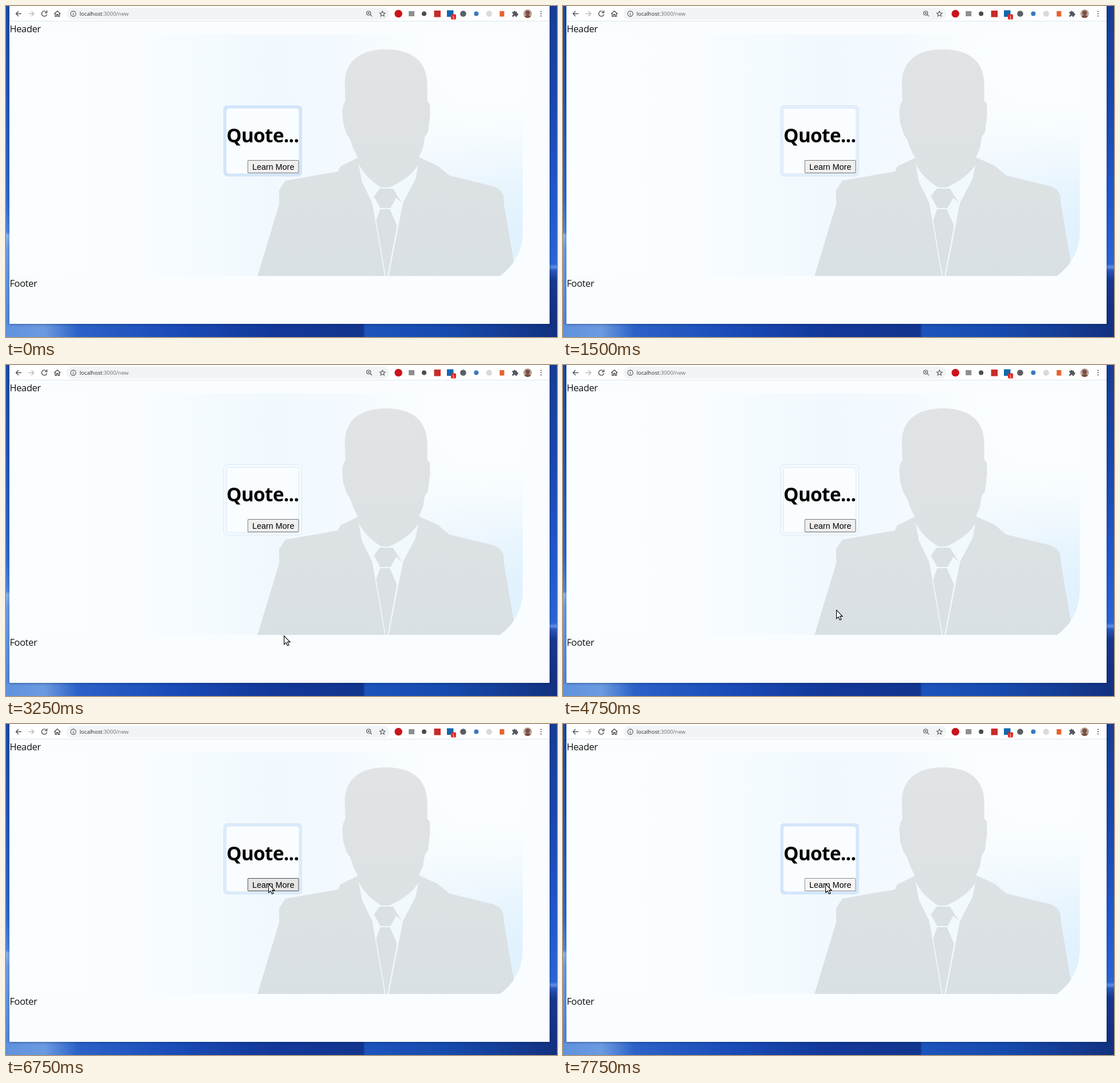
An HTML page that plays this animation: 966x580 px, repeating every 8000 ms.

```html
<!DOCTYPE html>
<html lang="en">
<head>
<meta charset="utf-8">
<title>Quote card</title>
<style>
html, body { margin: 0; width: 100%; height: 100%; overflow: hidden; background: #1c4fb8; }
svg { display: block; width: 966px; height: 580px; }
.ui { font-family: "Open Sans", "Noto Sans", sans-serif; }
.page { font-size: 16.5px; letter-spacing: -.35px; fill: #111; }
.icon { fill: none; stroke: #50545a; stroke-width: 1.4; }
</style>
</head>
<body>
<svg viewBox="0 0 966 580" xmlns="http://www.w3.org/2000/svg">
  <defs>
    <linearGradient id="side" x2="0" y2="1">
      <stop offset="0" stop-color="#1d4ba6"/><stop offset=".25" stop-color="#2053b4"/>
      <stop offset=".6" stop-color="#2e68d0"/><stop offset=".71" stop-color="#4f88de"/>
      <stop offset=".72" stop-color="#8fb4ec"/><stop offset=".76" stop-color="#6f9ee4"/>
      <stop offset="1" stop-color="#5488da"/>
    </linearGradient>
    <linearGradient id="right" x2="0" y2="1">
      <stop offset="0" stop-color="#173d94"/><stop offset=".3" stop-color="#1a48ae"/>
      <stop offset=".6" stop-color="#2058cc"/><stop offset=".81" stop-color="#2b64d4"/>
      <stop offset=".82" stop-color="#5f8fe4"/><stop offset=".83" stop-color="#2a55bc"/>
      <stop offset=".86" stop-color="#17388f"/><stop offset="1" stop-color="#142f80"/>
    </linearGradient>
    <linearGradient id="base">
      <stop offset="0" stop-color="#5f92de"/><stop offset=".07" stop-color="#6c9ae0"/>
      <stop offset=".13" stop-color="#2c62c8"/><stop offset=".3" stop-color="#1b4cb8"/>
      <stop offset=".48" stop-color="#12389a"/><stop offset=".648" stop-color="#12358e"/>
      <stop offset=".652" stop-color="#1c54bc"/><stop offset=".8" stop-color="#174aae"/>
      <stop offset="1" stop-color="#12317f"/>
    </linearGradient>
    <linearGradient id="sky">
      <stop offset="0" stop-color="#fbfeff"/><stop offset=".208" stop-color="#fafdff"/>
      <stop offset=".283" stop-color="#f8fcff"/><stop offset=".284" stop-color="#f6fcff"/>
      <stop offset=".5" stop-color="#f2f9fe"/><stop offset="1" stop-color="#f5fafe"/>
    </linearGradient>
    <radialGradient id="blue" gradientUnits="userSpaceOnUse" cx="915" cy="410" r="265">
      <stop offset="0" stop-color="#dff1fd"/><stop offset="1" stop-color="#dff1fd" stop-opacity="0"/>
    </radialGradient>
    <radialGradient id="white" gradientUnits="userSpaceOnUse" cx="850" cy="60" r="260">
      <stop offset="0" stop-color="#fbfeff"/><stop offset=".35" stop-color="#fbfeff"/>
      <stop offset="1" stop-color="#fbfeff" stop-opacity="0"/>
    </radialGradient>
    <linearGradient id="suit" x2="0" y2="1">
      <stop offset="0" stop-color="#e1e3e5"/><stop offset="1" stop-color="#d9e0e3"/>
    </linearGradient>
    <clipPath id="photo"><path d="M6 50H906V395C906 430 890 455 866 473H6Z"/></clipPath>
    <clipPath id="face"><circle cx="914.5" cy="13.5" r="7.5"/></clipPath>
    <filter id="soft" x="-5%" y="-5%" width="110%" height="110%"><feGaussianBlur stdDeviation="2"/></filter>
  </defs>

  <rect width="966" height="580" fill="url(#base)"/>
  <rect width="7" height="558" fill="url(#side)"/>
  <rect x="953" width="13" height="558" fill="url(#right)"/>
  <rect x="6" y="-5" width="947" height="563" fill="#061a4a" opacity=".45" filter="url(#soft)"/>
  <rect x="6" width="947" height="557" fill="#fafdff"/>
  <rect x="6" width="947" height="26" fill="#fff"/>
  <rect x="6" y="26" width="947" height="1" fill="#dfe3e6"/>

  <!-- toolbar -->
  <rect x="106" y="3" width="566" height="21" rx="10.5" fill="#f1f3f4"/>
  <g class="icon">
    <path d="M27 13.5H17.5M22 9L17.5 13.5L22 18"/>
    <path d="M39.5 13.5H49M44.5 9L49 13.5L44.5 18" stroke="#babcbe"/>
    <path d="M70.6 10.4A4.6 4.6 0 1 0 71.7 14.5M71.8 8V11.8H68"/>
    <path d="M84.5 13.8L90 8.8L95.5 13.8M86.3 12.5V18.3H88.7V14.8H91.3V18.3H93.7V12.5"/>
    <circle cx="118" cy="13.5" r="4.6" stroke-width="1.1"/>
    <path d="M118 12.8V16M118 10.8V11.8" stroke-width="1.2"/>
    <circle cx="635.8" cy="12.5" r="3.5" stroke-width="1.2"/>
    <path d="M638.5 15.2L641.5 18.2M634.2 12.5H637.4M635.8 10.9V14.1" stroke-width="1.2"/>
    <path d="M660 9L661.4 12.1 664.7 12.4 662.2 14.6 663 17.9 660 16.1 657 17.9 657.8 14.6 655.3 12.4 658.6 12.1Z" stroke-width="1.1"/>
  </g>
  <text class="ui" x="129" y="17" font-size="9.5" fill="#26282b">localhost<tspan fill="#6b7075">:3000/new</tspan></text>
  <circle cx="688" cy="13.5" r="6.8" fill="#c9141d"/>
  <rect x="706" y="9" width="10" height="9" fill="#8c9092"/>
  <circle cx="733" cy="13.5" r="4" fill="#484b50"/>
  <rect x="750.5" y="8" width="11.5" height="11.5" fill="#c62c28"/>
  <rect x="773" y="7.5" width="11.5" height="11.5" fill="#1268ad"/>
  <rect x="780" y="14.5" width="9" height="9" rx="1.5" fill="#df2a27"/>
  <text x="784.5" y="21.7" font-family="Liberation Sans, sans-serif" font-size="7" fill="#fff" text-anchor="middle">1</text>
  <circle cx="801.5" cy="13.5" r="5.3" fill="#5b5f64"/>
  <circle cx="824.5" cy="13.5" r="4" fill="#3b78bd"/>
  <circle cx="847" cy="13.5" r="5.2" fill="#d9dbdc"/>
  <rect x="865.5" y="9" width="8" height="9.5" fill="#e8622c"/>
  <path d="M887.5 10.3H890A1.7 1.7 0 1 1 893.4 10.3H896V13A1.7 1.7 0 1 1 896 16.3V18.7H893.2A1.6 1.6 0 0 0 890 18.7H887.5V16A1.6 1.6 0 0 0 887.5 12.8Z" fill="#55595e"/>
  <g clip-path="url(#face)">
    <rect x="907" y="6" width="15" height="15" fill="#b9a79c"/>
    <circle cx="914.5" cy="12" r="4" fill="#7b4e40"/>
    <ellipse cx="914.5" cy="21" rx="6.5" ry="5" fill="#7b4e40"/>
  </g>
  <g fill="#50545a"><circle cx="938" cy="9.5" r="1.1"/><circle cx="938" cy="13.5" r="1.1"/><circle cx="938" cy="17.5" r="1.1"/></g>

  <!-- hero -->
  <g clip-path="url(#photo)">
    <rect x="6" y="50" width="900" height="423" fill="url(#sky)"/>
    <rect x="6" y="50" width="900" height="423" fill="url(#blue)"/>
    <rect x="6" y="50" width="900" height="423" fill="url(#white)"/>
    <path fill="url(#suit)" d="M441 473L479 347 478.5 323 490 306 582 290 586 281 617 266 609 250 603 233 597 224 591 205 589.5 182 592 171 595 167 594 137C594 97 620 76 666 76C712 76 738 97 738.5 137L738.5 166 743 171 743.5 190 740 221 734 230 731 249 724 265 757 280 777 297 855 316 866 322 872 332 873 347 890 447V473Z"/>
    <path fill="#f2f9fd" d="M618 276Q630 301 658 318H672Q708 302 723 278L718 303 696 345 671 473H664L642 345 624 308Z"/>
    <g fill="#dae0e3">
      <path d="M655 320H678L686 333 674 354H656L646 335Z"/>
      <path d="M656 356H673L685.5 385 669 473H665.5L649 376Z"/>
      <path d="M679 321L694 345 684 336ZM654 321L643 337 648 333Z"/>
    </g>
  </g>
  <text class="ui page" x="6.4" y="45.5">Header</text>
  <text class="ui page" x="6.4" y="492">Footer</text>

  <!-- card -->
  <rect x="381.5" y="174.5" width="137" height="123.5" rx="6" fill="#f4fafe" stroke="#dae8f3"/>
  <rect id="glow" x="381" y="174" width="138" height="124.5" rx="6.5" fill="#d3e5fa"/>
  <rect x="386.5" y="179.5" width="127" height="114" rx="5" fill="#fafdff"/>
  <rect id="inner" x="386.5" y="179.5" width="127" height="114" rx="5" fill="none" stroke="#dae8f3"/>
  <text class="ui" x="386.5" y="239" font-size="33.5" font-weight="700" letter-spacing="-.7">Quote...</text>
  <rect id="button" x="424" y="270.5" width="89" height="22" rx="1"/>
  <text x="431.8" y="287" font-family="Liberation Sans, Arial, sans-serif" font-size="14.4">Learn More</text>

  <path id="cursor" d="M.5 .5V15.5L3.9 12.4 6.4 17.8 8.9 16.7 6.5 11.4H11Z" fill="#fff" stroke="#000" stroke-width="1.1"/>
</svg>
<script>
const LOOP = 8000, STEP = 250;
const get = id => document.getElementById(id);
const glow = get("glow"), inner = get("inner"), button = get("button"), cursor = get("cursor");

// rows: time, values...
const pulse = [[0, 1], [750, .86], [1500, .5], [2250, .12], [3000, 0], [4750, 0], [5750, .25], [6750, .7], [7750, .95], [8000, 1]];
const path = [
  [2000, 474, 519], [2250, 476, 482], [2750, 486, 477], [3250, 487, 474], [3750, 484, 445],
  [4250, 480, 431], [4750, 479, 429], [5000, 478, 434], [5500, 469, 345], [6000, 460, 280], [8000, 460, 280]
];

function along(rows, t) {
  const i = Math.max(1, rows.findIndex(r => r[0] >= t));
  const a = rows[i - 1], b = rows[i];
  const k = Math.max(0, (t - a[0]) / (b[0] - a[0]));
  return a.slice(1).map((v, n) => v + (b[n + 1] - v) * k);
}

function draw(ms) {
  const t = Math.floor((ms % LOOP) / STEP) * STEP;
  const [power] = along(pulse, t);
  glow.setAttribute("opacity", power);
  inner.setAttribute("opacity", 1 - power);

  const [x, y] = along(path, t);
  cursor.setAttribute("transform", `translate(${Math.round(x)} ${Math.round(y)})`);
  cursor.setAttribute("visibility", t < path[0][0] ? "hidden" : "visible");

  const hover = t >= path[0][0] && y < 293, pressed = t >= 7750;
  button.setAttribute("fill", pressed ? "#f5f5f5" : hover ? "#e5e5e5" : "#efefef");
  button.setAttribute("stroke", pressed ? "#8d8d8d" : hover ? "#4f4f4f" : "#767676");
}

const start = performance.now();
function tick() {
  draw(performance.now() - start);
  requestAnimationFrame(tick);
}
draw(0);
requestAnimationFrame(tick);
</script>
</body>
</html>
```
